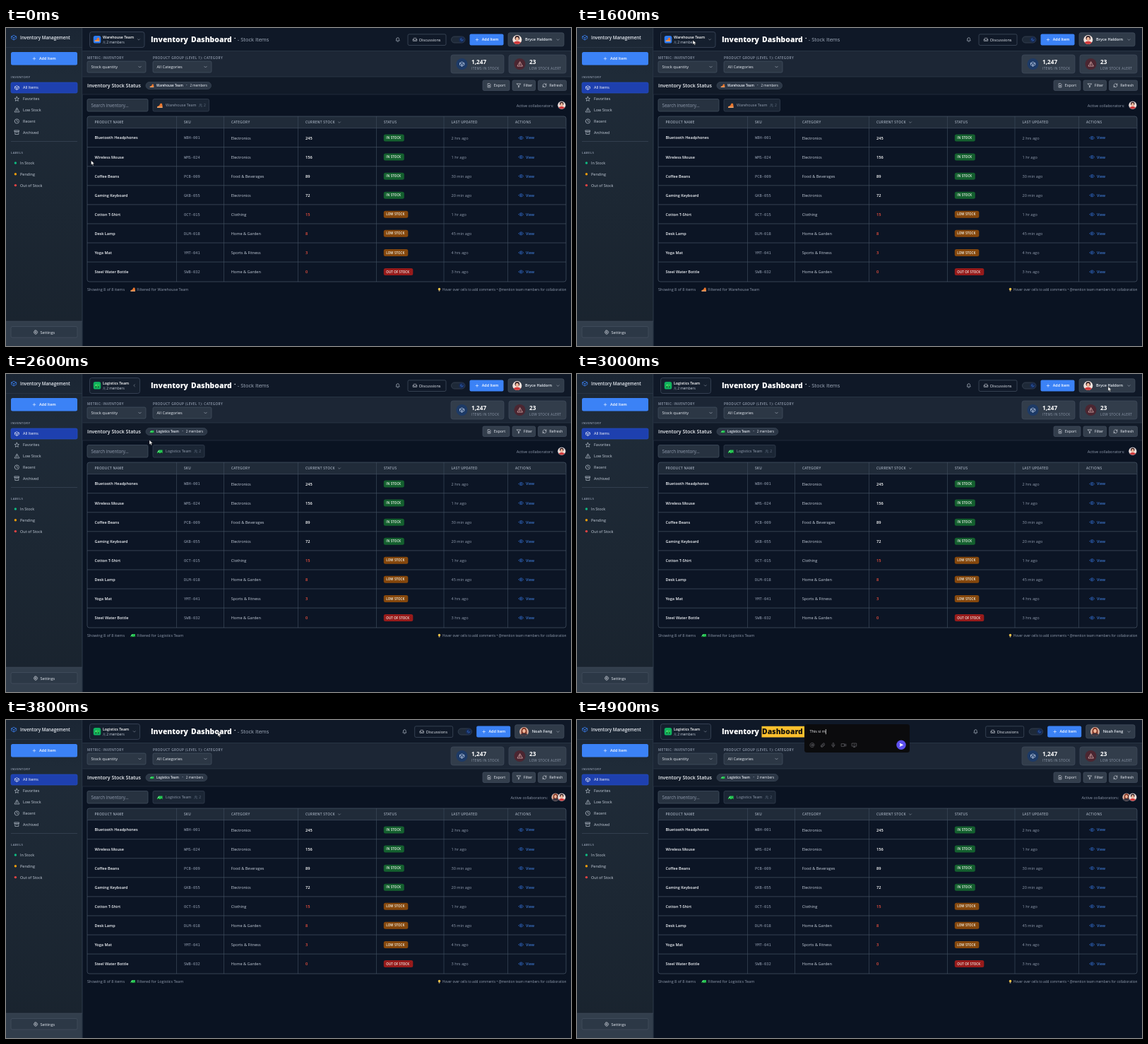
Write an HTML page that moves like this. It is 800 px wide and 450 px high and loops after 5 s.

```html
<!DOCTYPE html>
<html lang="en">
<head>
<meta charset="utf-8">
<title>Inventory Dashboard</title>
<style>
html, body { margin: 0; width: 100%; height: 100%; overflow: hidden; background: #0a1322; }
svg { display: block; width: 100%; height: 100%; }
text { font-family: "Open Sans", "Noto Sans", sans-serif; white-space: pre; }
.mono { font-family: "DejaVu Sans Mono", monospace; }
.caps { letter-spacing: .35px; }
</style>
</head>
<body>
<svg id="stage" viewBox="0 0 800 450"></svg>
<script>
const LIGHT = '#e8edf4', SOFT = '#c6cfdb', GRAY = '#929daf', DIM = '#7d899b', BLUE = '#3b82f6', LINE = '#3c4859';

const ICONS = {
  box: 'M21 8l-9-5-9 5v8l9 5 9-5zM3 8l9 5 9-5M12 13v8',
  star: 'M12 2l3 7 7 .6-5.3 4.8 1.6 7.2L12 18l-6.3 3.6 1.6-7.2L2 9.6 9 9z',
  alert: 'M12 3L1.5 21h21zM12 9v5M12 17v1',
  clock: 'M2 12a10 10 0 1 0 20 0a10 10 0 1 0-20 0M12 6v6l4 2',
  archive: 'M2 3h20v5H2zM4 8v13h16V8M10 12h4',
  gear: 'M9 12a3 3 0 1 0 6 0a3 3 0 1 0-6 0M9 3h6l1 3 3 1 2 5-2 5-3 1-1 3H9l-1-3-3-1-2-5 2-5 3-1z',
  chevron: 'M5 9l7 7 7-7',
  bell: 'M6 8a6 6 0 0 1 12 0c0 7 3 9 3 9H3s3-2 3-9M10 21h4',
  inbox: 'M22 12h-6l-2 3h-4l-2-3H2l4-8h12l4 8v7H2v-7',
  plus: 'M12 4v16M4 12h16',
  doc: 'M14 2H5v20h14V7zM12 18v-7m-3 3 3-3 3 3',
  funnel: 'M2 3h20l-8 9.5V20l-4 2v-9.5z',
  refresh: 'M3 12a9 9 0 0 1 15-6.7L21 8M21 3v5h-5M21 12a9 9 0 0 1-15 6.7L3 16M3 21v-5h5',
  eye: 'M1 12s4-7 11-7 11 7 11 7-4 7-11 7S1 12 1 12M9 12a3 3 0 1 0 6 0a3 3 0 1 0-6 0',
  users: 'M9 3a4 4 0 1 0 .1 0M2 21v-2a5 5 0 0 1 5-5h4a5 5 0 0 1 5 5v2M16 3a4 4 0 0 1 0 8M18 14a5 5 0 0 1 4 5v2',
  moon: 'M20 14A8.5 8.5 0 1 1 10 3a7 7 0 0 0 10 11z',
  check: 'M4 12l5 6L20 5',
  house: 'M3 21V9l9-6 9 6v12zM8 21v-7h8v7',
  at: 'M8 12a4 4 0 1 0 8 0a4 4 0 1 0-8 0M16 8v5c0 4 6 4 6-1a10 10 0 1 0-4 8',
  clip: 'M21 11l-9 9c-5 4-11-2-7-7l9-9c4-3 8 1 5 5l-9 9c-2 2-5-1-3-3l8-8',
  mic: 'M9 5a3 3 0 0 1 6 0v6a3 3 0 0 1-6 0zM5 11a7 7 0 0 0 14 0M12 18v4',
  video: 'M2 6h13v12H2zM15 11l7-4v10l-7-4',
  screen: 'M2 4h20v13H2zM8 21h8M12 17v4M9 11l3-3 3 3'
};

const rect = (x, y, w, h, fill, r = 0, stroke = 'none') =>
  `<rect x="${x}" y="${y}" width="${w}" height="${h}" rx="${r}" fill="${fill}" stroke="${stroke}" stroke-width=".7"/>`;
const circle = (x, y, r, fill) => `<circle cx="${x}" cy="${y}" r="${r}" fill="${fill}"/>`;
const line = (x1, y1, x2, y2, color = LINE) => `<path d="M${x1} ${y1}L${x2} ${y2}" stroke="${color}" stroke-width=".7"/>`;
// y is the middle of the text line
const text = (x, y, s, size = 5.6, fill = LIGHT, weight = 400, more = '') =>
  `<text x="${x}" y="${y + size * .36}" font-size="${size}" fill="${fill}" font-weight="${weight}" ${more}>${s}</text>`;
const caps = (x, y, s, size = 4.6, fill = GRAY, weight = 400) => text(x, y, s, size, fill, weight, 'class="caps"');
const icon = (name, x, y, size = 7, color = SOFT, weight = 2) =>
  `<path d="${ICONS[name]}" transform="translate(${x - size / 2} ${y - size / 2}) scale(${size / 24})" fill="none" stroke="${color}" stroke-width="${weight}" stroke-linecap="round" stroke-linejoin="round"/>`;
const place = (x, y, k, body) => `<g transform="translate(${x} ${y}) scale(${k})">${body}</g>`;
const group = (id, body, hidden) => `<g id="${id}"${hidden ? ' display="none"' : ''}>${body}</g>`;

const emblems = [
  '<path d="M-5 4V2l4-2 2-4h3l1 4v4z" fill="#e9782f"/><path d="M-5 2.6H5V4H-5z" fill="#f6c08f"/>',
  '<path d="M-5 3V1l3-4h7v6z" fill="#25c552"/><path d="M-3.8 0l2-2.2V0z" fill="#d6f5e0"/>' + circle(-2.5, 3, 1.3, '#14301f') + circle(2.8, 3, 1.3, '#14301f'),
  '<path d="M-4-4.5h8v9h-8z" fill="#e58a3a"/><path d="M-2.6-3h5.2v6.2h-5.2z" fill="#f3eef8"/>'
];
const tile = (i, x, y, s) =>
  rect(x - s / 2, y - s / 2, s, s, ['#2f7cf0', '#10b05f', '#8b4df0'][i], s / 4) + place(x, y, s / 16, emblems[i]);

const avatar = (i, x, y, r) => place(x, y, r, circle(0, 0, 1, ['#f4e3dd', '#dfb3a0'][i]) +
  (i ? '<path d="M-.6 .7V-.2Q-.5-.9 0-.9T.6-.2V.7z" fill="#7c3020"/>' : circle(0, -.35, .5, '#2a1a20')) +
  `<path d="M-.8 .6Q0 0 .8 .6A1 1 0 0 1-.8 .6z" fill="${['#cf3a3c', '#3b3540'][i]}"/>` +
  '<ellipse cy="-.15" rx=".34" ry=".42" fill="#efb598"/>');

const bulb = (x, y) => circle(x, y - .6, 1.7, '#f7c948') + rect(x - .8, y + 1, 1.6, 1.6, '#b9a27a');

function sidebar() {
  let s = rect(0, 0, 108, 450, 'url(#side)') + line(108, 0, 108, 450) + line(0, 27.5, 108, 27.5, '#2d3949');
  s += icon('box', 11, 13.5, 9, BLUE) + text(20, 13.5, 'Inventory Management', 6.25, LIGHT, 600);
  s += rect(7, 34, 94, 18.5, BLUE, 2.5) + icon('plus', 40, 43.3, 5.5, '#fff', 2.5) + text(47, 43.3, 'Add Item', 5.4, '#fff', 600);
  s += caps(7, 69, 'INVENTORY', 4.3, GRAY, 600) + rect(7, 77, 94, 15, '#1e40af', 2, '#2450c4');
  [['All Items', 'box'], ['Favorites', 'star'], ['Low Stock', 'alert'], ['Recent', 'clock'], ['Archived', 'archive']].forEach(([name, pic], i) => {
    const y = 84.5 + i * 15.8;
    s += icon(pic, 15.3, y, 7.5, i ? SOFT : '#fff') + text(24, y, name, 5.5, i ? SOFT : '#fff', 500);
  });
  s += line(7, 160.5, 101, 160.5) + caps(7, 176, 'LABELS', 4.3, GRAY, 600);
  [['In Stock', '#10b981'], ['Pending', '#f59e0b'], ['Out of Stock', '#ef4444']].forEach(([name, color], i) => {
    const y = 191 + i * 15.8;
    s += circle(13.4, y, 1.7, color) + text(20, y, name, 5.5, SOFT);
  });
  s += rect(0, 415, 107.6, 35, '#323e4c') + line(0, 415, 108, 415, '#404c5b');
  s += rect(7, 422.5, 94, 15.5, '#2c3846', 2, '#455160');
  return s + icon('gear', 42, 430.5, 7, LIGHT) + text(48.5, 430.5, 'Settings', 5.6, LIGHT, 500);
}

function panels() {
  let s = rect(108.4, 0, 692, 32, '#0f1827') + rect(108.4, 32, 692, 37, '#1c2635') + rect(108.4, 69, 692, 25, '#111a28');
  s += line(108.4, 32.5, 800, 32.5, '#2f3b4b') + line(108.4, 69, 800, 69, '#2f3b4b') + line(108.4, 94, 800, 94, '#273343');
  [[115, 'METRIC: INVENTORY', 'Stock quantity'], [208, 'PRODUCT GROUP (LEVEL 1): CATEGORY', 'All Categories']].forEach(([x, label, value]) => {
    s += caps(x, 42.5, label, 4.7, GRAY, 600) + rect(x, 47, 83, 16, '#2c3745', 2, '#465363');
    s += text(x + 5.5, 55, value, 5.7) + icon('chevron', x + 74.5, 55, 6);
  });
  [[630, 75, 'box', '#1d3a66', '#dbe8ff', '1,247', 'ITEMS IN STOCK'], [712, 81, 'alert', '#4b2631', '#f8c9c4', '23', 'LOW STOCK ALERT']].forEach(([x, w, pic, fill, color, n, label]) => {
    s += rect(x, 38, w, 26, '#323d4b', 3, '#414d5c') + circle(x + 15.5, 51, 8, fill) + icon(pic, x + 15.5, 51, 8, color);
    s += text(x + 29, 48, n, 8.2, '#fff', 700) + caps(x + 29, 57, label);
  });
  s += text(115, 81.5, 'Inventory Stock Status', 7, '#f3f6fa', 600);
  [[675, 38, 'doc', 'Export'], [717, 32.5, 'funnel', 'Filter'], [753.5, 40, 'refresh', 'Refresh']].forEach(([x, w, pic, label]) => {
    s += rect(x, 74, w, 14.5, '#333e4c', 2, '#445060') + icon(pic, x + 9, 81.3, 6.5, LIGHT) + text(x + 15.7, 81.3, label, 5.4, LIGHT, 500);
  });
  s += rect(115, 100.5, 86, 17.5, '#273240', 2, '#475464') + text(120.5, 109.5, 'Search inventory...', 6.2, GRAY);
  s += text(115, 370, 'Showing 8 of 8 items', 5.5, GRAY) + bulb(613.5, 370);
  return s + text(793.5, 370, 'Hover over cells to add comments • @mention team members for collaboration', 4.76, GRAY, 400, 'text-anchor="end"');
}

function table() {
  const rows = [
    ['Bluetooth Headphones', 'WBH-001', 'Electronics', 245, '2 hrs ago'],
    ['Wireless Mouse', 'WMS-024', 'Electronics', 156, '1 hr ago'],
    ['Coffee Beans', 'PCB-009', 'Food &amp; Beverages', 89, '30 min ago'],
    ['Gaming Keyboard', 'GKB-055', 'Electronics', 72, '20 min ago'],
    ['Cotton T-Shirt', 'OCT-015', 'Clothing', 15, '1 hr ago'],
    ['Desk Lamp', 'DLM-018', 'Home &amp; Garden', 8, '45 min ago'],
    ['Yoga Mat', 'YMT-041', 'Sports &amp; Fitness', 3, '4 hrs ago'],
    ['Steel Water Bottle', 'SWB-032', 'Home &amp; Garden', 0, '3 hrs ago']
  ];
  const cols = [115, 241.5, 308.5, 413.5, 524.5, 620, 710.5];
  let s = rect(115, 125, 678, 234, '#0c1525', 3) + rect(115, 125, 678, 16.5, '#202b39', 3);
  ['PRODUCT NAME', 'SKU', 'CATEGORY', 'CURRENT STOCK', 'STATUS', 'LAST UPDATED', 'ACTIONS'].forEach((name, i) => {
    s += caps(cols[i] + 10.4, 133.5, name, 4.7, '#a3aebd', 600);
    if (i) s += line(cols[i], 125, cols[i], 359);
  });
  s += icon('chevron', 472, 133.5, 5, SOFT);
  rows.forEach(([name, sku, kind, stock, ago], i) => {
    const y = 155.5 + i * 27.07, low = stock < 20;
    const [label, fill, w] = !low ? ['IN STOCK', '#14602f', 29] : stock ? ['LOW STOCK', '#85470c', 34.5] : ['OUT OF STOCK', '#971b1b', 41.5];
    s += line(115, y - 13.9, 793, y - 13.9, '#465264');
    s += text(125.4, y, name, 5.5, '#f3f6fa', 600) + text(252, y, sku, 5.4, GRAY, 400, 'class="mono"');
    s += text(318.7, y, kind, 5.6, SOFT) + text(424, y, stock, 5.7, low ? '#f2513f' : '#fff', 600);
    s += rect(534.8, y - 5, w, 10, fill, 2.5) + text(538.3, y, label, 4.4, '#f4f7f0', 600, 'letter-spacing=".15"');
    s += text(630.5, y, ago, 5.6, GRAY) + icon('eye', 729.3, y, 7, BLUE) + text(736, y, 'View', 5.5, '#4a90fb', 500);
  });
  return s + rect(115, 125, 678, 234, 'none', 3, '#4a5668');
}

function team(i) {
  const name = ['Warehouse Team', 'Logistics Team'][i];
  let s = rect(118.5, 5.5, 77.5 - 6.5 * i, 22, '#151f2e', 3, '#445063') + tile(i, 129, 16.3, 10.5);
  s += text(137, 13, name, 5.3, '#fff', 600) + icon('users', 139, 20.5, 4.2, GRAY) + text(142.2, 20.5, '2 members', 4.8, SOFT);
  s += rect(198, 76.5, 92.5 - 5.7 * i, 10, '#2c3746', 5, '#3c4858') + place(206.5, 81.7, .55, emblems[i]);
  s += text(213, 81.7, name, 4.55, LIGHT, 600) + text(255 - 5.7 * i, 81.7, '•', 4.5, GRAY) + text(260.5 - 5.8 * i, 81.7, '2 members', 4.6, LIGHT, 500);
  s += rect(208, 100.5, 79.5 - 6.5 * i, 17.5, '#1b2635', 2, '#374354') + place(217.8, 109.7, .75, emblems[i]);
  s += text(226, 109.5, name, 5.4, GRAY) + icon('users', 275.5 - 6.7 * i, 109.5, 5, '#637083') + text(280 - 6.7 * i, 109.5, '2', 5, '#637083');
  return s + place(179.7, 370, .65, emblems[i]) + text(185.3, 370, 'Filtered for ' + name, 5.45, GRAY);
}

function account(i) {
  const x = 9.7 * i;
  let s = icon('bell', 554.7 + x, 16.5, 7) + rect(569 + x, 8.8, 54, 15.7, '#101928', 2, '#465263');
  s += icon('inbox', 579 + x, 16.5, 6.5, LIGHT) + text(585 + x, 16.5, 'Discussions', 5.6, LIGHT, 500);
  s += rect(630.5 + x, 12, 19.5, 9, '#1e2938', 4.5, '#3d4959') + circle(645.3 + x, 16.5, 4.2, '#172a52') + icon('moon', 645.3 + x, 16.5, 5, BLUE);
  s += rect(656.5 + x, 8.5, 48, 16, BLUE, 2) + icon('plus', 667 + x, 16.5, 5.5, '#fff', 2.5) + text(673.8 + x, 16.5, 'Add Item', 5.4, '#fff', 600);
  s += rect(711 + x, 6.8, 79 - x, 19, '#303b49', 2.5, '#455161') + avatar(i, 723.8 + x, 16.5, 6.5);
  s += text(735 + x, 16.5, ['Bryce Haldorn', 'Noah Feng'][i], 5.55, LIGHT, 600) + icon('chevron', 781.5, 16.5, 5.5);
  s += text(722.7 - 8.3 * i, 109.5, 'Active collaborators:', 5.6, GRAY);
  if (i) s += circle(778, 109.2, 6, '#3a4658') + avatar(1, 778, 109.2, 5.4);
  return s + circle(786.8, 109.2, 6, '#3a4658') + avatar(0, 786.8, 109.2, 5.4);
}

function menu() {
  let s = rect(118.5, 31.5, 132.5, 134, '#1d2735', 3, '#414d5d') + icon('house', 129.3, 41.5, 5, GRAY) + text(135, 41.5, 'Switch Organization', 4.8, GRAY, 500);
  s += rect(124, 50, 122, 29, '#18294a', 2.5, '#2a62c9');
  [['Warehouse Team', 'Main warehouse operati...'], ['Logistics Team', 'Supply chain and distributio...'], ['Procurement Team', 'Purchasing and supplier rel...']].forEach(([name, note], i) => {
    const y = 64.3 + i * 30.8;
    if (i) s += group('hover' + i, rect(124, y - 14.5, 122, 29, '#353f4d', 2.5), true);
    s += tile(i, 133.5, y, 11.5) + text(144, y - 6.5, name, 5.3, '#fff', 600);
    s += icon('users', 145.8, y + 4.3, 4, GRAY) + text(149.5, y + 1.3, '2', 4.6, GRAY) + text(149.5, y + 7.5, 'members', 4.6, GRAY);
    s += text(175.5, y + 4.6, note, 4.7, GRAY);
  });
  s += icon('check', 195, 57.8, 4.5, '#60a5fa') + circle(240.7, 64.3, 1.8, BLUE);
  s += rect(118.8, 146, 132, 19.5, '#f8f9fa', 2) + bulb(126.2, 155.8);
  const mid = 'text-anchor="middle"';
  return s + text(188.5, 152.8, 'Only users from selected organization are visible in', 4.7, '#6b7280', 400, mid) + text(188.5, 159.3, 'comments', 4.7, '#6b7280', 400, mid);
}

function composer() {
  const send = (y, fill, color) => circle(459, y, 6.7, fill) + place(459, y, .3, `<path d="M-8-9L11 0-8 9l3-9z" fill="${color}"/>`);
  const empty = rect(322, 6, 149, 22, '#0b0b0d', 3.5) + text(330, 16.8, 'Comment or type @ to add others', 5.55, '#77787e') + send(17, '#36328c', '#a9947c');
  const full = rect(322, 6, 149, 40, '#0b0b0d', 3.5) + send(35.3, '#5d50ee', '#fff') +
    ['at', 'clip', 'mic', 'video', 'screen'].map((name, i) => icon(name, 333 + i * 14.9, 35.5, 7.5, '#6d6e74')).join('');
  return group('empty', empty) + group('full', full) + text(329.5, 16.5, '', 5.5, '#f1f1f3', 400, 'id="typed"') + '<rect id="caret" y="13" width=".7" height="7.2" fill="#fff"/>';
}

const arrow = '<path d="M0 0v6.2l1.5-1.3 1 2.3 1.1-.5-1-2.2h2z" fill="#fff" stroke="#111" stroke-width=".4"/>';
const hand = '<path d="M-.6 .4q.6-.8 1.2 0v2.4l2.4 .6q.7 .2 .5 1l-.6 2.8h-3.2l-2-2.8q.2-1 1.2-.3l.5 .5z" fill="#fff" stroke="#111" stroke-width=".4"/>';

stage.innerHTML = '<defs><linearGradient id="side" x2="0" y2="1"><stop stop-color="#1b2634"/><stop offset=".15" stop-color="#1f2b38"/><stop offset="1" stop-color="#19232e"/></linearGradient></defs>' +
  rect(0, 0, 800, 450, '#0a1322') + sidebar() + panels() + table() +
  text(205, 16.7, 'Inventory', 10.4, '#fff', 800) + group('mark', rect(261.5, 8.8, 60.8, 15.7, '#fbbf2d')) +
  text(262, 16.7, 'Dashboard', 10.4, '#fff', 800, 'id="word"') + circle(324.2, 14.5, .8, LIGHT) + text(327.8, 16.7, '- Stock Items', 7.5, '#a5b0c0') +
  [0, 1].map(i => group('team' + i, team(i)) + group('user' + i, account(i))).join('') +
  group('fold', icon('chevron', 0, 0, 5, SOFT)) + group('menu', menu()) + group('composer', composer()) +
  group('cursor', group('arrow', arrow) + group('hand', hand));

const path = [[0, 120.5, 187.5], [1000, 412, 27.5], [1650, 160, 17], [2000, 170, 112.5], [2400, 166, 96], [2600, 203, 93.5],
  [2950, 752, 17], [3100, 752, 20], [3400, 323.5, 29], [3750, 300, 17], [5000, 300, 17]];
const $ = id => document.getElementById(id);
const show = (id, on) => $(id).setAttribute('display', on ? 'inline' : 'none');
const clamp = v => Math.max(0, Math.min(1, v));

function pointer(t) {
  const i = path.findIndex(p => p[0] > t), [t0, x0, y0] = path[i - 1], [t1, x1, y1] = path[i];
  const u = (t - t0) / (t1 - t0), k = u * u * (3 - 2 * u);
  return [x0 + (x1 - x0) * k, y0 + (y1 - y0) * k];
}

function draw(t) {
  const [x, y] = pointer(t), open = t >= 1700 && t < 2500;
  const second = t >= 2500, swapped = t >= 3150, marked = t >= 3900;
  show('team0', !second); show('team1', second);
  show('user0', !swapped); show('user1', swapped);
  const turn = 180 * (clamp((t - 1700) / 200) - clamp((t - 2500) / 200));
  $('fold').setAttribute('transform', `translate(${second ? 181.7 : 188} 16.3) rotate(${turn})`);

  show('menu', open);
  show('hover1', y > 80.5 && y < 109.5);
  show('hover2', y > 111 && y < 140);
  show('cursor', t < 4100);
  show('arrow', !open); show('hand', open);
  $('cursor').setAttribute('transform', `translate(${x} ${y})`);

  show('mark', marked);
  $('word').setAttribute('fill', marked ? '#15130c' : '#fff');
  const count = Math.floor(9 * clamp((t - 4350) / 540));
  show('composer', t >= 4100);
  show('empty', !count); show('full', count);
  $('typed').textContent = 'This si m'.slice(0, count);
  $('caret').setAttribute('x', 329.5 + (count && $('typed').getComputedTextLength()));
}

const start = performance.now();
function tick() {
  draw((performance.now() - start) % 5000);
  requestAnimationFrame(tick);
}
tick();
</script>
</body>
</html>
```
